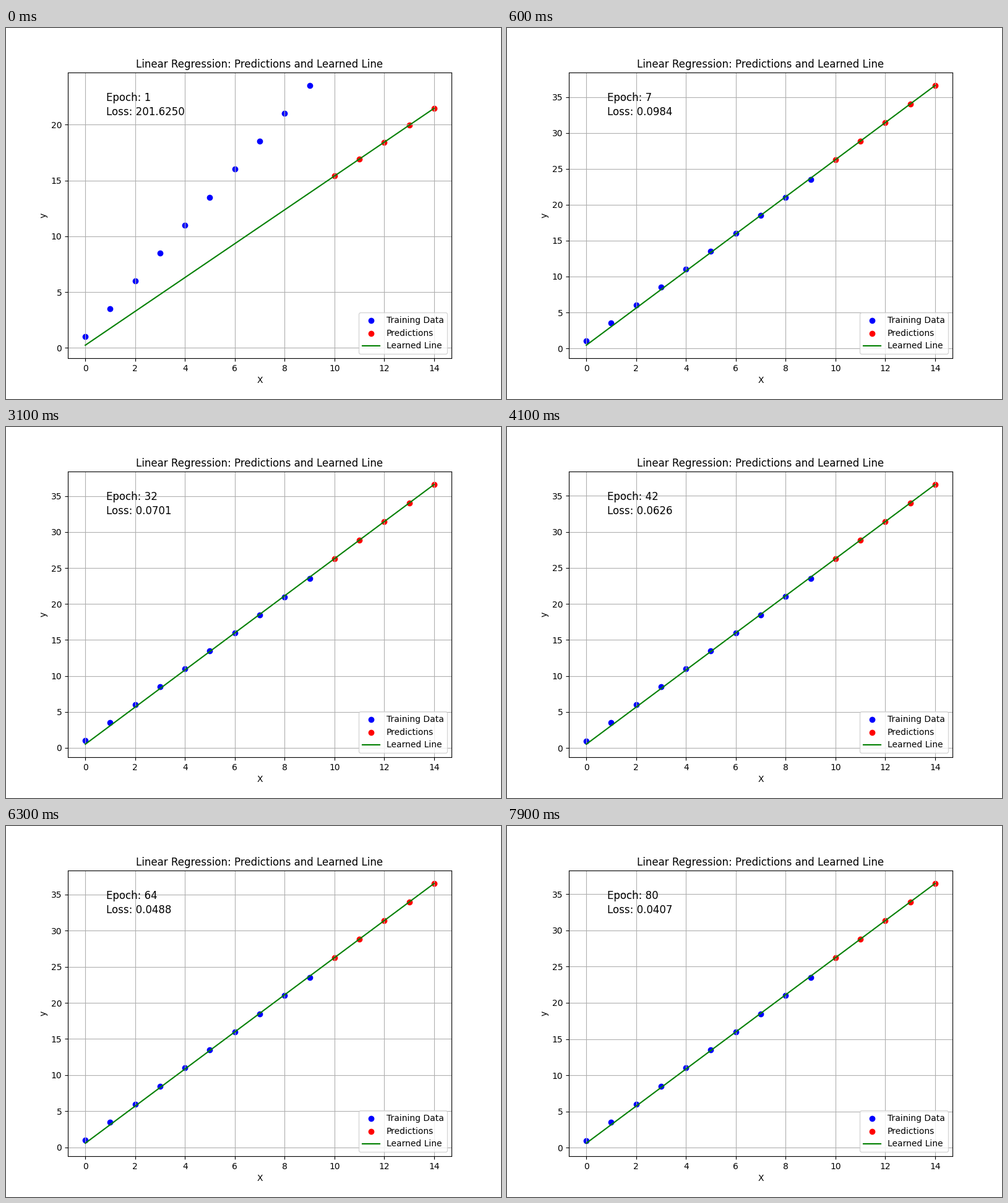
These frames come from a looping animation (800x600 px, 8000 ms). A matplotlib script:

```python
import matplotlib.pyplot as plt
import numpy as np
from matplotlib.animation import FuncAnimation

EPOCHS = 80
RATE = 0.01

x_train = np.arange(10.0)
y_train = 2.5 * x_train + 1
x_test = np.arange(10.0, 15.0)
x_all = np.concatenate([x_train, x_test])


def train():
    """Gradient descent: (loss before the step, weight, bias after it)."""
    w = b = 0.0
    steps = []
    for _ in range(EPOCHS):
        err = w * x_train + b - y_train
        loss = np.mean(err ** 2)
        w -= RATE * 2 * np.mean(err * x_train)
        b -= RATE * 2 * np.mean(err)
        steps.append((loss, w, b))
    return steps


history = train()

fig, ax = plt.subplots(figsize=(8, 6), dpi=100)
ax.scatter(x_train, y_train, color="blue", label="Training Data")
dots = ax.scatter(x_test, x_test, color="red", label="Predictions")
line, = ax.plot(x_all, x_all, color="green", label="Learned Line")
epoch_text = ax.text(0.1, 0.9, "", transform=ax.transAxes, fontsize=12)
loss_text = ax.text(0.1, 0.85, "", transform=ax.transAxes, fontsize=12)
ax.set_title("Linear Regression: Predictions and Learned Line")
ax.set_xlabel("X")
ax.set_ylabel("y")
ax.set_xlim(-0.7, 14.7)
ax.legend(loc="lower right")
ax.grid(True)


def update(i):
    loss, w, b = history[i]
    fit = w * x_all + b
    line.set_ydata(fit)
    dots.set_offsets(np.column_stack([x_test, w * x_test + b]))
    epoch_text.set_text(f"Epoch: {i + 1}")
    loss_text.set_text(f"Loss: {loss:.4f}")

    low = min(fit.min(), y_train.min())
    high = max(fit.max(), y_train.max())
    pad = 0.05 * (high - low)
    ax.set_ylim(low - pad, high + pad)
    return line, dots, epoch_text, loss_text


anim = FuncAnimation(fig, update, frames=EPOCHS, interval=100,
                     repeat=True, repeat_delay=0, blit=False)
plt.show()
```
